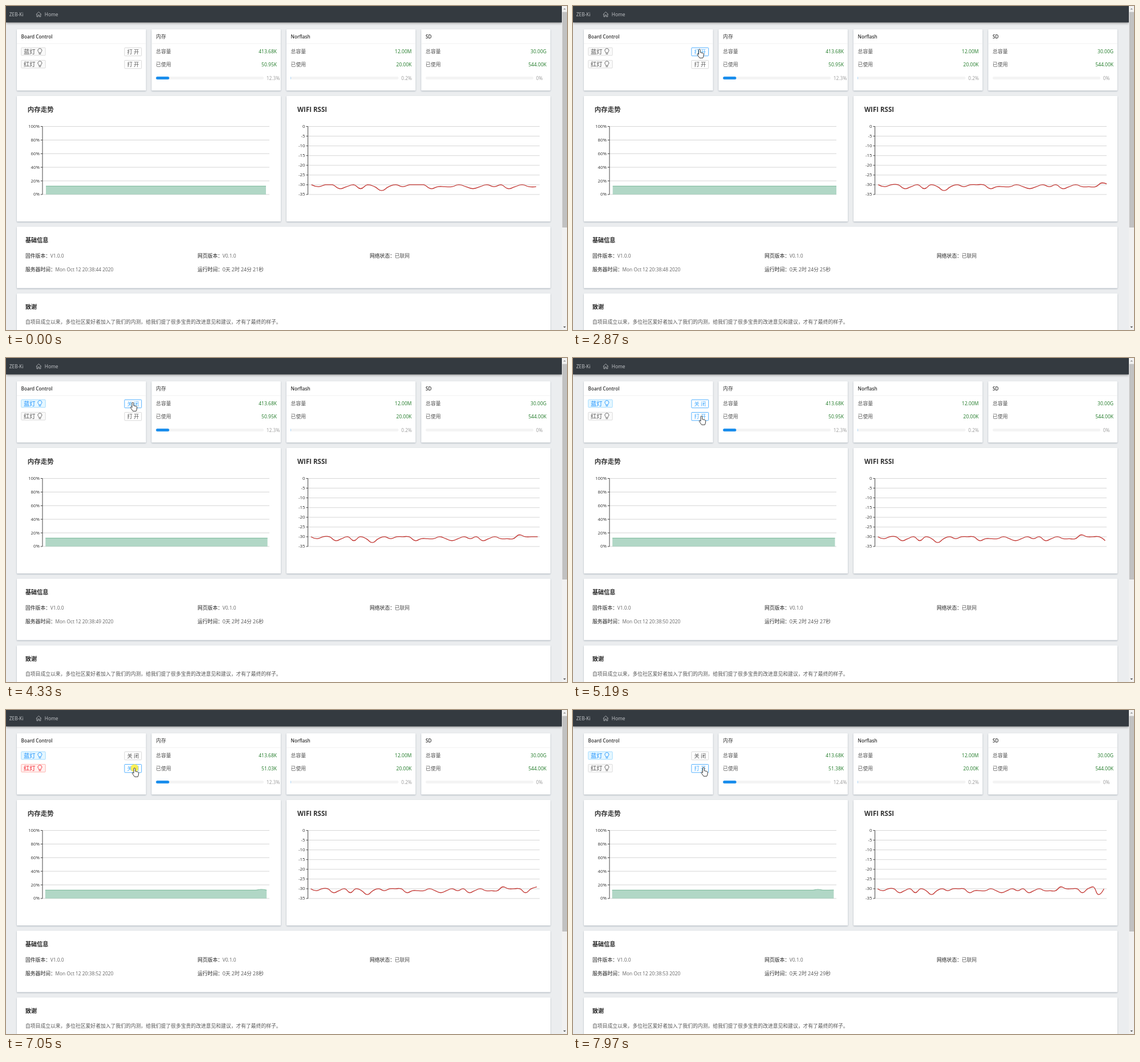
An HTML page for the animation above (8 s loop, 984x569 px).

```html
<!DOCTYPE html>
<html lang="zh-CN">
<head>
<meta charset="utf-8">
<title>Board dashboard</title>
<style>
html, body { margin: 0; width: 100%; height: 100%; overflow: hidden; background: #ebedef; }
svg { display: block; width: 984px; height: 569px; }
text { font-family: "Open Sans", "Noto Sans CJK SC", "Noto Sans CJK", sans-serif; font-size: 8.8px; fill: #555; white-space: pre; }
.card { fill: #fff; filter: drop-shadow(0 1px .8px rgba(35, 55, 80, .34)); }
.bar { fill: #343a40; filter: drop-shadow(0 1px 2px rgba(0, 0, 0, .45)); }
.nav { font-size: 8.4px; fill: #c4c7ca; }
.head { font-size: 8.2px; font-weight: 600; fill: #333; }
.cjk { font-size: 8.8px; font-weight: 500; }
.num { font-size: 8.5px; fill: #1f7a27; text-anchor: end; }
.pct { font-size: 8.4px; fill: #9b9b9b; }
.axis { font-size: 7.9px; fill: #333; text-anchor: end; }
.title { font-size: 11.5px; font-weight: 700; fill: #333; }
.sub { font-size: 10.1px; font-weight: 700; fill: #222; }
.label { fill: #222; }
.val { font-size: 8.4px; fill: #666; }
.grid { stroke: #ccc; stroke-width: .8; }
.tick { stroke: #333; stroke-width: .9; fill: none; }
.tag rect { fill: #fafafa; stroke: #d4d4d4; stroke-width: .8; }
.tag text { font-size: 10.3px; fill: #555; }
.tag path { fill: none; stroke: #555; stroke-width: .9; }
.blue rect { fill: #e6f7ff; stroke: #91d5ff; }
.blue text { fill: #1890ff; }
.blue path { stroke: #1890ff; }
.red rect { fill: #fff1f0; stroke: #ffa39e; }
.red text { fill: #f5222d; }
.red path { stroke: #f5222d; }
.btn rect { fill: #fff; stroke: #d4d4d4; stroke-width: .9; }
.btn text { font-size: 9.3px; fill: #555; text-anchor: middle; }
.hot rect { stroke: #40a9ff; }
.hot text { fill: #40a9ff; }
.focus rect { stroke: #40a9ff; }
.focus text { fill: #40a9ff; }
.wave text { opacity: .5; }
.wave rect { stroke-width: 1.3; }
#hand, #arrow { stroke: #222; stroke-width: .9; stroke-linejoin: round; fill: #fff; }
</style>
</head>
<body>
<svg id="stage" viewBox="0 0 984 569"></svg>
<script>
const LOOP = 8000;
const TOP = 211.5, BOTTOM = 331;
const MEM = { x: 64, w: 398 }, WIFI = { x: 529.6, w: 406.4 };

// signal strength, in -dBm
const rssi = [30, 31, 30, 30, 32, 31, 30, 32, 30, 31, 33, 31, 30, 31, 30, 30, 30, 32, 31, 31, 31, 30,
  31, 32, 31, 30, 31, 30, 32, 31, 30, 31, 31, 31, 29, 30, 30, 30, 32, 30, 29, 33, 30];
const memory = rssi.map((_, i) => i === 39 ? 13.4 : i === 42 ? 12.4 : 12.3);

// each start time adds one sample
const FIRST = 33;
const updates = [457, 1840, 2850, 3912, 4200, 5080, 6115, 6430, 7062, 7640];

const clock = [[0, 44, 21], [460, 45, 22], [1860, 47, 23], [2850, 48, 25], [3912, 49, 26],
  [5080, 50, 27], [6120, 51, 28], [6430, 52, 28], [7640, 53, 29]];
const used = [[0, '50.95K', 12.3], [6120, '55.37K', 13.4], [6430, '51.03K', 12.3], [7640, '51.38K', 12.4]];
const pointer = [[2410, 772, 494], [2560, 350, 89], [2700, 350, 89], [2850, 222, 76], [3330, 222, 76],
  [3390, 222.5, 78], [4880, 222.5, 78], [5100, 225.5, 102], [7430, 225.5, 102], [7600, 229, 101]];
const clicks = [3790, 5450, 7050];

const text = (x, y, s, cls = '', id = '') => `<text x="${x}" y="${y}" class="${cls}" id="${id}">${s}</text>`;
const rect = (x, y, w, h, attr = '') => `<rect x="${x}" y="${y}" width="${w}" height="${h}" ${attr}/>`;
const card = (x, y, w, h) => rect(x, y, w, h, 'rx="1" class="card"');
const line = (x1, y1, x2, y2, cls) => `<path d="M${x1} ${y1}L${x2} ${y2}" class="${cls}"/>`;

function statCard(x, name, total, amount, pct, id) {
  const l = x + 7.8;
  return card(x, 41, 226.6, 107.5) + rect(x, 65.6, 226.6, .8, 'fill="#eee"') +
    text(l, 57, name, name === '内存' ? 'head cjk' : 'head') +
    text(l, 83.3, '总容量') + text(l, 106, '已使用') +
    text(x + 219.7, 83.2, total, 'num') + text(x + 219.7, 105.9, amount, 'num', id) +
    rect(l, 124, 189, 5, 'rx="2.5" fill="#f4f4f4"') +
    rect(l, 124, 1.89 * pct, 5, `rx="2.5" fill="#1b8eec" id="${id}Bar"`) +
    text(x + 201.5, 129.6, pct + '%', 'pct', id + 'Pct');
}

function tag(id, y, name) {
  return `<g id="${id}" class="tag">${rect(26.8, y, 42.4, 13.6, 'rx="1.2"')}${text(31, y + 10.6, name)}
    <path d="M57.6 ${y + 9.3}v-1.4a3.5 3.5 0 1 1 3.6 0v1.4zM57.6 ${y + 11.2}h3.6"/></g>`;
}

const button = (id, y) =>
  `<g id="${id}" class="btn">${rect(207.9, y, 29.8, 14.3, 'rx="1"')}${text(222.9, y + 10.6, '打 开')}</g>`;

function axes(plot, steps, label) {
  let s = '';
  for (let i = 0; i <= steps; i++) {
    const y = TOP + (BOTTOM - TOP) * i / steps;
    s += line(plot.x, y, plot.x + plot.w, y, 'grid') + line(plot.x - 3.2, y, plot.x, y, 'tick') +
      text(plot.x - 5, y + 2.4, label(i), 'axis');
  }
  return s + line(plot.x, TOP, plot.x, BOTTOM, 'tick');
}

const clip = (id, p) => `<clipPath id="${id}">${rect(p.x, TOP - 2, p.w, BOTTOM - TOP + 3)}</clipPath>`;
const field = (x, y, name, value, id = '', w = 5, cls = 'val') =>
  text(x, y, name + '：', 'label') + text(x + w * 8.75, y, value, cls, id);

stage.innerHTML =
  `<defs>${clip('memClip', MEM)}${clip('wifiClip', WIFI)}</defs>` +
  rect(0, 0, 984, 569, 'fill="#ebedef"') +
  rect(0, 0, 975, 28.8, 'class="bar"') +
  text(5.8, 17.6, 'ZEB-Ki', 'nav') + text(67.8, 17.6, 'Home', 'nav') +
  '<path d="M52.8 14.8L57.4 10.4 62 14.8M54 14V18.8H56.2V15.8H58.6V18.8H60.8V14" fill="none" stroke="#c4c7ca" stroke-width=".8"/>' +

  card(19, 41, 226.6, 107.5) + rect(19, 65.6, 226.6, .8, 'fill="#eee"') +
  text(26.5, 56.6, 'Board Control', 'head') +
  tag('lamp1', 73.2, '蓝灯') + tag('lamp2', 95.4, '红灯') +
  button('btn1', 73.3) + button('btn2', 95.5) +
  statCard(255.3, '内存', '413.68K', '50.95K', 12.3, 'mem') +
  statCard(491.8, 'Norflash', '12.00M', '20.00K', .2, 'nor') +
  statCard(728.3, 'SD', '30.00G', '544.00K', 0, 'sd') +

  card(19, 158, 463, 220.4) + card(492, 158, 463, 220.4) +
  text(37.8, 185.8, '内存走势', 'title') + text(511, 185.6, 'WIFI RSSI', 'title') +
  axes(MEM, 5, i => 100 - 20 * i + '%') + axes(WIFI, 7, i => -5 * i) +
  '<g clip-path="url(#memClip)"><path id="area" fill="#91c7ae" fill-opacity=".7"/>' +
  '<path id="memLine" fill="none" stroke="#85bea3" stroke-width="1.2"/></g>' +
  '<g clip-path="url(#wifiClip)"><path id="wifiLine" fill="none" stroke="#c23531" stroke-width="1.3" stroke-linejoin="bevel"/></g>' +

  card(19, 387.6, 936, 107.8) + text(34, 414.8, '基础信息', 'sub') +
  field(34, 441.8, '固件版本', 'V1.0.0') + field(336, 441.8, '网页版本', 'V0.1.0') +
  field(638, 441.8, '网络状态', '已联网', '', 5, '') +
  field(34, 466.4, '服务器时间', '', 'date', 6) + field(336, 466.4, '运行时间', '', 'uptime', 5, '') +

  card(19, 504.8, 936, 80) + text(34, 531.9, '致谢', 'sub') +
  text(34, 558.3, '自项目成立以来，多位社区爱好者加入了我们的内测，给我们提了很多宝贵的改进意见和建议，才有了最终的样子。') +

  rect(975, 0, 9, 569, 'fill="#f1f1f1"') + rect(975.7, 10.5, 8.3, 378.5, 'fill="#c1c1c1"') +
  '<path d="M977.3 6.3l2.4-2.6 2.4 2.6z" fill="#999"/><path d="M977.3 562.7l2.4 2.6 2.4-2.6z" fill="#505050"/>' +
  '<circle id="ring" r="6.8" fill="#ffee30" fill-opacity=".82"/>' +
  '<path id="hand" d="M-1.5 1.3a1.4 1.4 0 0 1 2.8 0v4.4l4.4 1q1.7.5 1.6 2.2l-.6 4-1 2.4h-5.6l-4-5.8q-.7-1.5.7-1.8l1.7 1.4z"/>' +
  '<path id="arrow" d="M0 0v12l2.8-2.6 1.9 4.3 1.9-.9-1.9-4.1h3.8z"/>';

const $ = id => document.getElementById(id);
const set = (id, name, value) => $(id).setAttribute(name, value);
const at = (rows, t) => rows.filter(r => r[0] <= t).pop();
const clamp = (v, lo, hi) => Math.min(hi, Math.max(lo, v));

// smooth curve with control points held inside the overall bounds
function curve(pts) {
  const ys = pts.map(p => p[1]), lo = Math.min(...ys), hi = Math.max(...ys);
  let d = 'M' + pts[0], out = pts[0];
  for (let i = 1; i < pts.length; i++) {
    const p = pts[i], a = pts[i - 1], b = pts[i + 1];
    let into = p, next = p;
    if (b) {
      const la = Math.hypot(p[0] - a[0], p[1] - a[1]), lb = Math.hypot(b[0] - p[0], b[1] - p[1]);
      const k = lb / (la + lb), vx = (b[0] - a[0]) / 2, vy = (b[1] - a[1]) / 2;
      into = [p[0] - vx * (1 - k), clamp(p[1] - vy * (1 - k), lo, hi)];
      next = [p[0] + vx * k, clamp(p[1] + vy * k, lo, hi)];
    }
    d += `C${out} ${into} ${p}`;
    out = next;
  }
  return d;
}

function drawCharts(t) {
  const n = FIRST + updates.filter(u => u <= t).length;
  const start = updates[n - FIRST - 1];
  const ease = start === undefined ? 1 : 1 - (1 - Math.min(1, (t - start) / 300)) ** 3;
  const band = 1 / (n - 1) + (1 / n - 1 / (n - 1)) * ease;
  const points = (plot, data, max) => data.slice(0, n).map((v, i) =>
    [plot.x + plot.w * band * (i + .5), v / max]);
  const mem = points(MEM, memory, 100).map(([x, v]) => [x, BOTTOM - v * (BOTTOM - TOP)]);
  const wifi = points(WIFI, rssi, 35).map(([x, v]) => [x, TOP + v * (BOTTOM - TOP)]);
  const top = curve(mem);
  set('memLine', 'd', top);
  set('area', 'd', `${top}L${mem[n - 1][0]} ${BOTTOM}L${mem[0][0]} ${BOTTOM}Z`);
  set('wifiLine', 'd', curve(wifi));
}

function drawPointer(t) {
  const i = pointer.filter(p => p[0] <= t).length - 1;
  let x = -50, y = -50;
  if (i >= 0) {
    const a = pointer[i], b = pointer[i + 1] || a;
    const k = b === a ? 0 : (t - a[0]) / (b[0] - a[0]);
    x = a[1] + (b[1] - a[1]) * k;
    y = a[2] + (b[2] - a[2]) * k;
  }
  const over = x > 207 && x < 238;
  const place = `translate(${x} ${y})`;
  set('hand', 'transform', over ? place : 'translate(-50 -50)');
  set('arrow', 'transform', over ? 'translate(-50 -50)' : place);
  set('ring', 'transform', place);
  set('ring', 'visibility', clicks.some(c => t >= c && t < c + 130) ? 'visible' : 'hidden');
  return over ? (y < 90 ? 1 : y > 95 ? 2 : 0) : 0;
}

function drawControls(t, hover) {
  const on = [t >= 4200, t >= 6120 && t < 7500];
  const focus = t >= clicks[1] ? 2 : t >= clicks[0] ? 1 : 0;
  const wave = t >= clicks[0] && t < 4050;
  ['blue', 'red'].forEach((color, i) => {
    const k = i + 1, btn = $('btn' + k);
    set('lamp' + k, 'class', on[i] ? 'tag ' + color : 'tag');
    btn.setAttribute('class', 'btn' + (hover === k ? ' hot' : '') + (focus === k ? ' focus' : '') +
      (wave && k === 1 ? ' wave' : ''));
    btn.lastChild.textContent = on[i] ? '关 闭' : '打 开';
  });
}

function render(t) {
  drawCharts(t);
  drawControls(t, drawPointer(t));
  const [, sec, up] = at(clock, t), [, amount, pct] = at(used, t);
  $('date').textContent = `Mon Oct 12 20:38:${sec} 2020`;
  $('uptime').textContent = `0天 2时 24分 ${up}秒`;
  $('mem').textContent = amount;
  $('memPct').textContent = pct + '%';
  set('memBar', 'width', 1.89 * pct);
}

const begin = performance.now();
function frame() {
  render((performance.now() - begin) % LOOP);
  requestAnimationFrame(frame);
}
frame();
</script>
</body>
</html>
```
